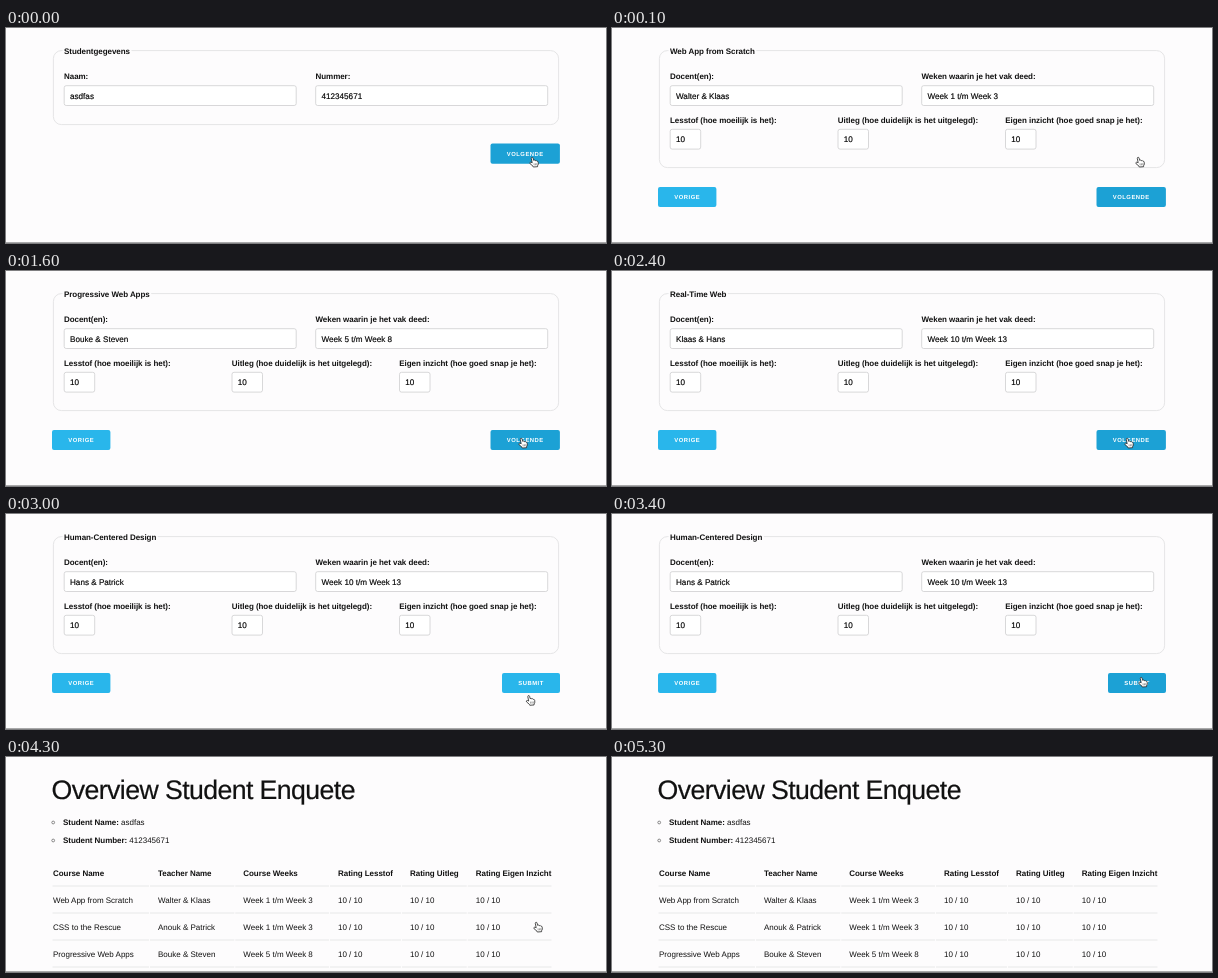
These frames come from a looping animation (600 px wide and 215 px high, 5900 ms). An HTML page:

```html
<!DOCTYPE html>
<html lang="nl">
<head>
<meta charset="utf-8">
<title>Student Enquete</title>
<style>
  html, body { margin: 0; width: 100%; height: 100%; overflow: hidden; background: #fdfcfd; }
  svg { display: block; width: 600px; height: 215px; }
  text { font: 8px "Liberation Sans", Arial, sans-serif; fill: #111; text-rendering: geometricPrecision; white-space: pre; }
  .bold, .legend { font-weight: 700; letter-spacing: -.05px; }
  .legend { stroke: #fdfcfd; stroke-width: 4px; paint-order: stroke; }
  .value { font-size: 8.15px; fill: #000; stroke: #000; stroke-width: .15px; }
  .title { font-size: 26.7px; letter-spacing: -.59px; stroke: #111; stroke-width: .2px; }
  .caption { font-size: 5.87px; font-weight: 700; letter-spacing: .53px; fill: #fff; }
  .frame { fill: none; stroke: #dfdfe0; stroke-width: .8; }
  .input { fill: #fff; stroke: #cfcfd0; stroke-width: .8; }
  .rule { stroke: #e1e1e2; stroke-width: .8; }
  .bullet { fill: none; stroke: #444; stroke-width: .6; }
  .light { fill: #29b6eb; }
  .dark { fill: #1ca1d5; }
</style>
</head>
<body>
<svg id="stage" viewBox="0 0 600 215"></svg>
<script>
const LOOP = 5900, STEP = 100;
const stage = document.getElementById("stage");

function add(parent, tag, attrs, content = "") {
  const el = document.createElementNS("http://www.w3.org/2000/svg", tag);
  for (const name in attrs) el.setAttribute(name, attrs[name]);
  el.textContent = content;
  parent.append(el);
  return el;
}
const text = (parent, x, y, content, cls = "") => add(parent, "text", { x, y, class: cls }, content);
const box = (parent, x, y, width, height, rx, cls) => add(parent, "rect", { x, y, width, height, rx, class: cls });

function field(parent, x, y, width, label, value) {
  text(parent, x, y, label, "bold");
  box(parent, x + .2, y + 6.5, width, 19.8, 2, "input");
  text(parent, x + 6, y + 19.5, value, "value");
}

function button(parent, x, y, width, label, cls) {
  const face = box(parent, x, y, width, 20.1, 2, cls);
  text(parent, x + 16.2, y + 12.4, label, "caption");
  return face;
}

function form(legend, height) {
  const page = add(stage, "g", {});
  box(page, 47.4, 22.6, 505.2, height, 8, "frame");
  text(page, 58, 25.6, legend, "legend");
  return page;
}

function studentPage() {
  const page = form("Studentgegevens", 74);
  field(page, 58, 51.2, 232, "Naam:", "asdfas");
  field(page, 309.5, 51.2, 232, "Nummer:", "412345671");
  button(page, 484.5, 115.6, 69.4, "VOLGENDE", "dark");
  return page;
}

function coursePage([course, teachers, weeks]) {
  const page = form(course, 117);
  field(page, 58, 51.2, 232, "Docent(en):", teachers);
  field(page, 309.5, 51.2, 232, "Weken waarin je het vak deed:", weeks);
  field(page, 58, 94.8, 30.5, "Lesstof (hoe moeilijk is het):", "10");
  field(page, 225.8, 94.8, 30.5, "Uitleg (hoe duidelijk is het uitgelegd):", "10");
  field(page, 393.3, 94.8, 30.5, "Eigen inzicht (hoe goed snap je het):", "10");
  button(page, 46, 159, 58.4, "VORIGE", "light");
  return page;
}

function overviewPage(courses) {
  const page = add(stage, "g", {});
  text(page, 45.6, 42.3, "Overview Student Enquete", "title");
  [["Student Name:", " asdfas"], ["Student Number:", " 412345671"]].forEach(([label, value], i) => {
    const y = 68 + i * 18;
    add(page, "circle", { cx: 47.2, cy: y - 2.5, r: 1.4, class: "bullet" });
    const line = text(page, 57, y, "");
    add(line, "tspan", { class: "bold" }, label);
    add(line, "tspan", {}, value);
  });

  const columns = [47, 152, 237.3, 332, 404, 469.8];
  const edges = [46.5, 144, 229.3, 324, 396, 461.8, 546.5];
  const header = ["Course Name", "Teacher Name", "Course Weeks", "Rating Lesstof", "Rating Uitleg", "Rating Eigen Inzicht"];
  const rows = courses.slice(0, 3).map(course => [...course, "10 / 10", "10 / 10", "10 / 10"]);
  [header, ...rows].forEach((row, r) => row.forEach((cell, c) => {
    const y = 119.2 + r * 27;
    text(page, columns[c], y, cell, r ? "" : "bold");
    add(page, "line", { x1: edges[c], x2: edges[c + 1] - 1, y1: y + 9.8, y2: y + 9.8, class: "rule" });
  }));
  return page;
}

const courses = [
  ["Web App from Scratch", "Walter & Klaas", "Week 1 t/m Week 3"],
  ["CSS to the Rescue", "Anouk & Patrick", "Week 1 t/m Week 3"],
  ["Progressive Web Apps", "Bouke & Steven", "Week 5 t/m Week 8"],
  ["Real-Time Web", "Klaas & Hans", "Week 10 t/m Week 13"],
  ["Human-Centered Design", "Hans & Patrick", "Week 10 t/m Week 13"]
];
const pages = [studentPage(), ...courses.map(coursePage), overviewPage(courses)];
const pageStarts = [0, 100, 1100, 1600, 2100, 2700, 3900];
pages.slice(1, 5).forEach(page => button(page, 484.5, 159, 69.4, "VOLGENDE", "dark"));
const submit = button(pages[5], 496, 159, 58, "SUBMIT", "dark");

add(stage, "rect", { y: 214, width: 600, height: 1, fill: "#a9a9aa" });

const hand = add(stage, "g", {});
add(hand, "path", {
  d: "M-1.8 .8L-2.7-3.5Q-2.7-4.7-1.9-4.7T-.9-3.9L-.4-1.7Q.7-2.3 1.3-1.4Q2.3-1.9 2.8-.9Q4-1 4.2.2L4.3 2Q4.1 3.2 3.5 3.8L3.6 4.7L-.7 5L-1 4.2L-4 1.6Q-4.6.6-3.7.3Q-2.9.1-1.8.8Z",
  fill: "#fff", stroke: "#222", "stroke-width": .8, "stroke-linejoin": "round"
});
add(hand, "path", { d: "M0 1.4L.2 3.4M1.4 1.3L1.6 3.3M2.7 1.2L2.9 3.2", stroke: "#333", "stroke-width": .45 });

// time, x, y of the pointer
const route = [
  [0, 528, 134], [500, 528, 134], [700, 525, 144], [900, 518, 168], [1000, 517, 172],
  [2700, 517, 172], [2900, 522, 184], [3100, 527, 188.5], [3200, 528, 188],
  [3400, 531, 168], [3800, 532, 170], [5000, 532, 170], [5200, 513, 117], [LOOP, 513, 117]
];

function pointerAt(time) {
  const i = route.findIndex(key => key[0] > time);
  const [from, to] = [route[i - 1], route[i]];
  const part = (time - from[0]) / (to[0] - from[0]);
  return [1, 2].map(k => from[k] + (to[k] - from[k]) * part);
}

function draw(time) {
  const current = pageStarts.filter(start => start <= time).length - 1;
  pages.forEach((page, i) => page.style.display = i === current ? "" : "none");
  submit.setAttribute("class", time >= 2900 && time < 3300 ? "light" : "dark");
  hand.setAttribute("transform", `translate(${pointerAt(time)})`);
  hand.style.display = time < 5300 ? "" : "none";
}

const start = performance.now();
function tick() {
  const time = (performance.now() - start) % LOOP;
  draw(Math.floor(time / STEP) * STEP);
  requestAnimationFrame(tick);
}
tick();
</script>
</body>
</html>
```
